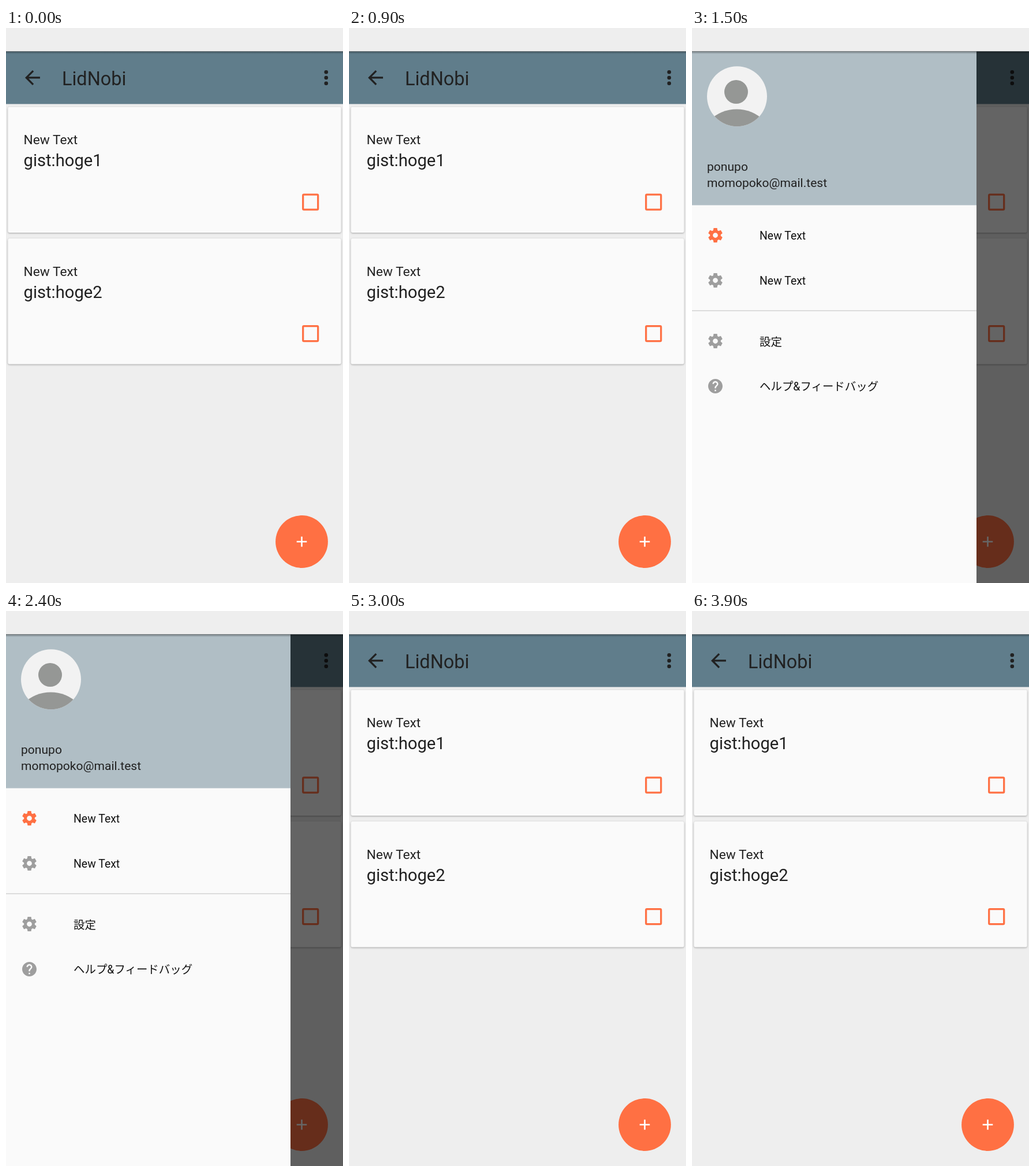
Write an HTML page that moves like this. It is 584 px wide and 960 px high and loops after 4500 ms.

```html
<!DOCTYPE html>
<html lang="ja">
<head>
<meta charset="utf-8">
<style>
  html, body { margin: 0; height: 100%; overflow: hidden; background: #eee; }
  svg { display: block; font-family: Roboto, "Noto Sans CJK JP", sans-serif; }
  .card rect:first-child { filter: drop-shadow(0 1.5px 1.5px rgba(0, 0, 0, .32)); }
</style>
</head>
<body>
<svg width="584" height="960" viewBox="0 0 584 960" fill="#212121">
  <defs>
    <linearGradient id="shade" x2="0" y2="1">
      <stop stop-opacity=".38"/>
      <stop offset="1" stop-opacity="0"/>
    </linearGradient>
    <clipPath id="face"><circle cx="78" cy="118.300" r="52"/></clipPath>
    <path id="tooth" d="M-3-6.500-2.500-9.600Q-2.400-10-2-10H2Q2.400-10 2.500-9.600L3-6.500Z"/>
    <g id="gear">
      <circle r="5.500" fill="none" stroke="currentColor" stroke-width="4"/>
      <g id="teeth" fill="currentColor"></g>
    </g>
  </defs>

  <rect width="584" height="960" fill="#eee"/>
  <rect y="40.500" width="584" height="91" fill="#607d8b"/>
  <path transform="translate(26.500 66.500) scale(1.622)" d="M20 11H7.830l5.590-5.590L12 4l-8 8 8 8 1.410-1.410L7.830 13H20z"/>
  <text x="97" y="98.500" font-size="32.440">LidNobi</text>
  <g id="dots">
    <circle cx="554.800" cy="76.300" r="3.300"/>
    <circle cx="554.800" cy="86" r="3.300"/>
    <circle cx="554.800" cy="95.800" r="3.300"/>
  </g>
  <g id="cards"></g>
  <circle cx="512.500" cy="888.500" r="45.400" fill="#ff7043"/>
  <path d="M503.700 888.500h17.600M512.500 879.700v17.600" stroke="#fff" stroke-width="2.600"/>

  <g id="drawer" visibility="hidden">
    <rect y="40.500" width="584" height="919.500" fill-opacity=".6" fill="#000"/>
    <rect y="40.500" width="493" height="919.500" fill="#fafafa"/>
    <rect y="40.500" width="493" height="266" fill="#b0bec5"/>
    <g clip-path="url(#face)" fill="#959795">
      <rect x="26" y="66" width="104" height="105" fill="#f2f2f2"/>
      <circle cx="76.500" cy="110.500" r="20.500"/>
      <circle cx="77.500" cy="207.500" r="67"/>
    </g>
    <g font-size="21.090">
      <text x="26" y="247">ponupo</text>
      <text x="26" y="275">momopoko@mail.test</text>
    </g>
    <rect y="488" width="493" height="2" fill="#dcdcdc"/>
    <g id="menu" font-size="19.460" fill="#111"></g>
    <path transform="translate(25.500 604.500) scale(1.250)" fill="#9e9e9e" d="M12 2C6.480 2 2 6.480 2 12s4.480 10 10 10 10-4.480 10-10S17.520 2 12 2zm1 17h-2v-2h2zm2.070-7.750l-.9.920C13.450 12.900 13 13.500 13 15h-2v-.5c0-1.100.45-2.100 1.170-2.830l1.240-1.260c.37-.36.59-.86.59-1.410 0-1.100-.9-2-2-2s-2 .9-2 2H8c0-2.210 1.790-4 4-4s4 1.790 4 4c0 .88-.36 1.680-.93 2.250z"/>
  </g>
  <rect y="40" width="584" height="5" fill="url(#shade)"/>
</svg>
<script>
const byId = id => document.getElementById(id);

byId('teeth').innerHTML = [0, 60, 120, 180, 240, 300]
  .map(a => `<use href="#tooth" transform="rotate(${a})"/>`).join('');

byId('cards').innerHTML = [1, 2].map(n => `
  <g class="card" transform="translate(0 ${(n - 1) * 227.6})">
    <rect x="3.300" y="136.500" width="577.400" height="217.500" rx="3" fill="#fafafa"/>
    <text x="30.500" y="201" font-size="22.700">New Text</text>
    <text x="30.500" y="239" font-size="29.200">gist:hoge${n}</text>
    <rect x="514.700" y="288.100" width="26" height="26" rx="1.600"
      fill="none" stroke="#ff7043" stroke-width="3.240"/>
  </g>`).join('');

const gear = (y, color) =>
  `<use href="#gear" color="${color}" transform="translate(40.500 ${y}) scale(1.250)"/>`;
const label = (y, text) => `<text x="117" y="${y}">${text}</text>`;
byId('menu').innerHTML =
  gear(358.5, '#ff7043') + label(366, 'New Text') +
  gear(436.5, '#9e9e9e') + label(444, 'New Text') +
  gear(541.5, '#9e9e9e') + label(549.5, '設定') +
  label(627, 'ヘルプ&amp;フィードバッグ');

function draw() {
  const t = performance.now() % 4500;
  byId('drawer').setAttribute('visibility', t >= 1500 && t < 3000 ? 'visible' : 'hidden');
  requestAnimationFrame(draw);
}
draw();
</script>
</body>
</html>
```
